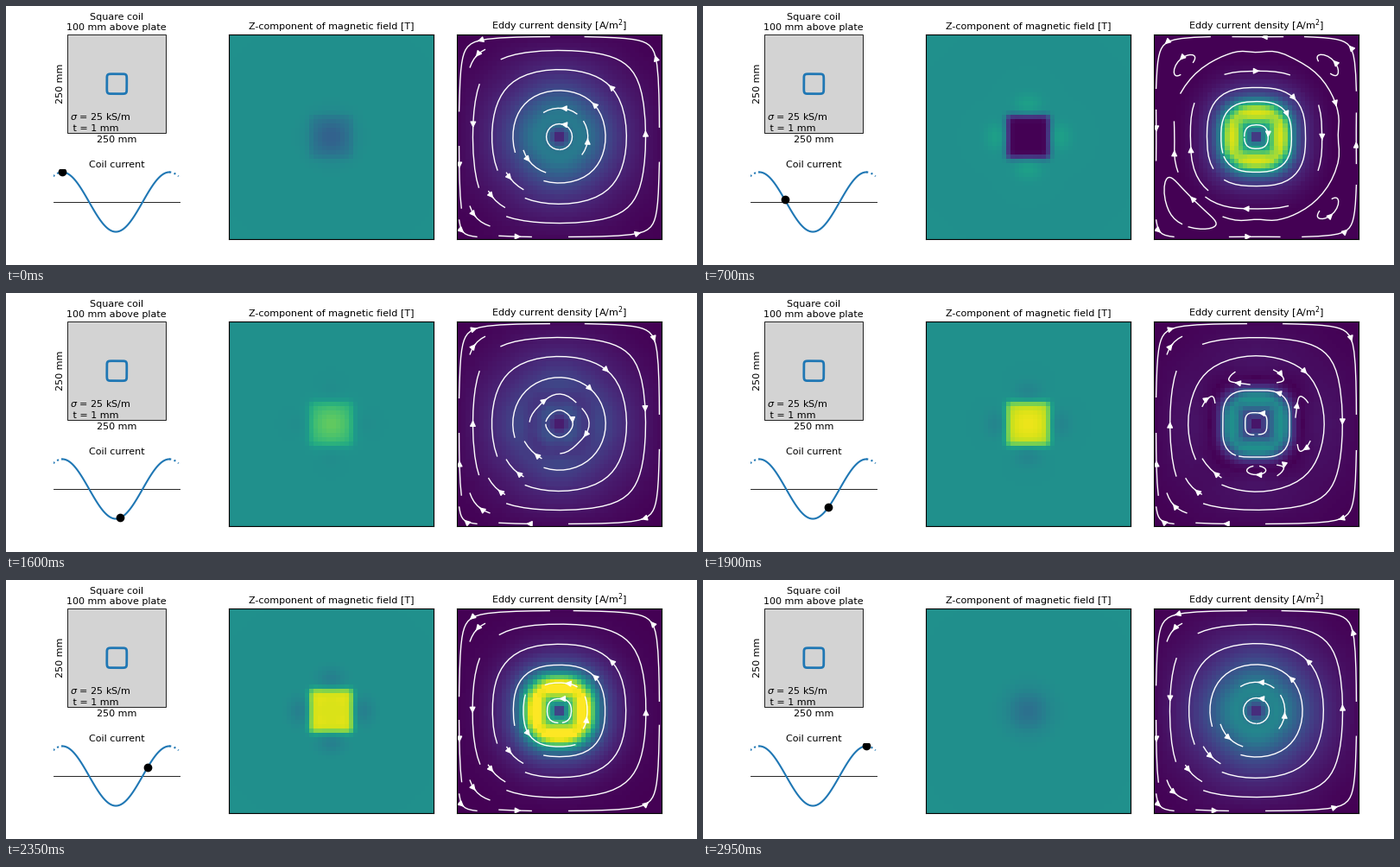
Animation of 800 by 300 pixels, one loop 3000 ms. Source, as a matplotlib script:

```python
import numpy as np
import matplotlib.pyplot as plt
from matplotlib.animation import FuncAnimation

W, H, DPI = 800, 300, 100
FRAMES, INTERVAL = 60, 50
N = 46            # cells per side of the plate
SIDE = 237        # panel side in pixels

plt.rcParams.update({"font.family": "DejaVu Sans", "font.size": 8})
fig = plt.figure(figsize=(W / DPI, H / DPI), dpi=DPI, facecolor="white")


def add_axes(left, top, width, height):
    return fig.add_axes([left / W, 1 - (top + height) / H, width / W, height / H])


# Plate grid, normalised to -1..1
axis = (np.arange(N) + 0.5) / N * 2 - 1
x, y = np.meshgrid(axis, axis)

# Broad current: contours go from circles to the square plate edge
rho = np.sqrt(x**2 + y**2 - (x * y) ** 2)
broad = 0.096 * rho / (rho**2 + 0.28**2) ** 1.5 - 0.065 * rho
broad_u = -broad * y * (1 - x**2) / rho
broad_v = broad * x * (1 - y**2) / rho

# Current close to the coil: rounded square contours
P = 2.7
sq = (abs(x) ** P + abs(y) ** P) ** (1 / P)
near = np.interp(
    sq,
    [0, 0.06, 0.11, 0.16, 0.20, 0.26, 0.31, 0.36, 0.42, 0.5, 0.6, 0.7, 0.8, 1],
    [0, 0.42, 0.62, 0.80, 0.95, 1.0, 0.76, 0.46, 0.25, 0.13, 0.06, 0.025, 0.0065, 0],
)
near_u = -near * np.sign(y) * (abs(y) / sq) ** (P - 1)
near_v = near * np.sign(x) * (abs(x) / sq) ** (P - 1)


def slab(d):
    return 0.5 * (np.tanh((d + 25) / 4) - np.tanh((d - 25) / 4))


def lobe(along, across):
    return np.exp(-(((abs(along) - 37) / 12) ** 2) - (across / 15) ** 2)


# Magnetic field: sharp coil footprint, return lobes and a diffuse blob
px, py = x * SIDE / 2, y * SIDE / 2
box = slab(px) * slab(py)
coil_field = box - 0.14 * (lobe(px, py) + lobe(py, px))
blob = np.exp(-(px**2 + py**2) / 24**2)


def magnetic(k, phase):
    start = 0.06 * np.exp(-k / 4) * box
    return -0.5 * coil_field * np.sin(phase) - 0.13 * blob * np.cos(phase) - start


def eddy(k, phase):
    c = np.cos(phase) * (1 - 0.1 * np.exp(-k / 3))
    s = np.sin(phase)
    return c * broad_u - s * near_u, c * broad_v - s * near_v


# Coil sketch, in pixel coordinates
sketch = fig.add_axes([0, 0, 1, 1])
sketch.set(xlim=(0, W), ylim=(H, 0))
sketch.axis("off")
sketch.add_patch(plt.Rectangle((71, 33), 114, 114, fc="lightgray", ec="black", lw=0.6))
angle = np.linspace(0, 2 * np.pi, 201)
ca, sa = np.cos(angle), np.sin(angle)
sketch.plot(128.3 + 11.5 * np.sign(ca) * abs(ca) ** 0.25,
            90.2 + 11.5 * np.sign(sa) * abs(sa) ** 0.25,
            color="C0", lw=2, solid_capstyle="butt")


def label(tx, ty, text, **kw):
    sketch.text(tx, ty, text, **{"ha": "center", "va": "baseline", **kw})


label(128, 27.7, "Square coil\n100 mm above plate")
label(128.3, 158.5, "250 mm")
label(62.8, 90, "250 mm", rotation=90, va="center")
label(74.4, 144.7, "$\\sigma$ = 25 kS/m\n t = 1 mm", ha="left")
label(128, 187.2, "Coil current")

# Coil current curve
wave = add_axes(54.7, 189, 147, 76)
wave.set(xlim=(-10.5 / 124, 136.5 / 124), ylim=(-1.1, 1.1))
wave.axis("off")
wave.axhline(0, color="black", lw=0.6)
for a, b, style in ((-0.085, 0, ":"), (0, 1, "-"), (1, 1.085, ":")):
    t = np.linspace(a, b, 120)
    wave.plot(t, np.cos(2 * np.pi * t), style, color="C0", lw=1.5)
dot, = wave.plot([0], [1], "o", color="black", ms=6, zorder=5)


def panel(left, title, vmin, vmax):
    ax = add_axes(left, 33, SIDE, SIDE)
    img = ax.imshow(np.zeros((N, N)), extent=(-1, 1, -1, 1), origin="lower",
                    cmap="viridis", vmin=vmin, vmax=vmax, interpolation="nearest")
    ax.set(xticks=[], yticks=[], xlim=(-1, 1), ylim=(-1, 1))
    ax.autoscale(False)
    ax.set_title(title, fontsize=8, pad=4.3)
    return ax, img


_, field_img = panel(258, "Z-component of magnetic field [T]", -0.5, 0.5)
eddy_ax, eddy_img = panel(522, "Eddy current density [A/m$^2$]", 0, 1)


def draw(k):
    turn = k / (FRAMES - 1)
    phase = 2 * np.pi * turn
    dot.set_data([turn], [np.cos(phase)])
    field_img.set_data(magnetic(k, phase))
    u, v = eddy(k, phase)
    eddy_img.set_data(np.hypot(u, v))
    for old in list(eddy_ax.collections) + list(eddy_ax.patches):
        old.remove()
    eddy_ax.streamplot(axis, axis, u, v, density=0.4, color="white", linewidth=1)
    return dot, field_img, eddy_img


anim = FuncAnimation(fig, draw, frames=FRAMES, interval=INTERVAL, blit=False)
plt.show()
```
